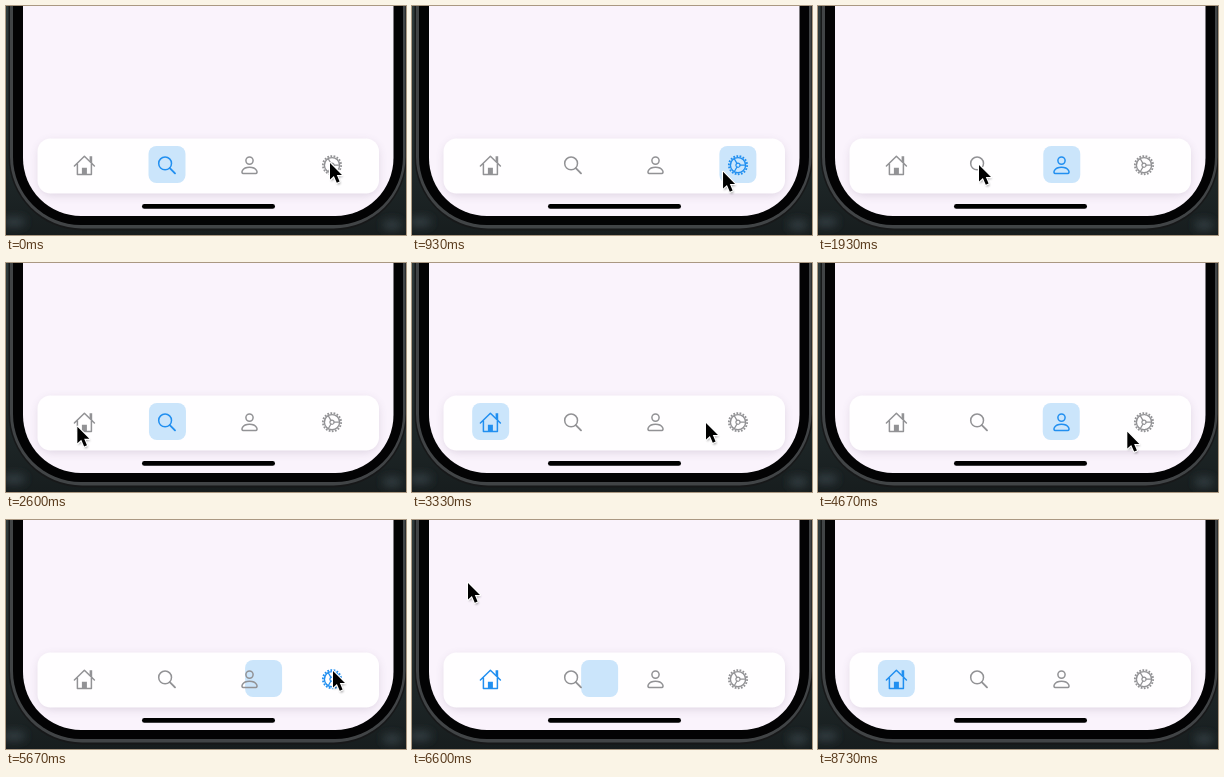
Write an HTML page that moves like this. It is 400 px wide and 229 px high and loops after 9.14 s.

```html
<!DOCTYPE html>
<html lang="en">
<head>
<meta charset="utf-8">
<title>Tab bar</title>
<style>
  html, body { margin: 0; width: 100%; height: 100%; overflow: hidden; background: #192021; }
  svg { display: block; width: 100%; height: 100%; }
  .icon { color: #929295; fill: none; stroke: currentColor; stroke-width: 1.5; stroke-linecap: round; stroke-linejoin: round; }
  .icon.active { color: #218ff0; }
  .solid { fill: currentColor; stroke: none; }
</style>
</head>
<body>
<svg viewBox="0 0 400 229" preserveAspectRatio="none">
  <defs>
    <linearGradient id="backdrop" x2="0" y2="1">
      <stop offset="0" stop-color="#303b3c"/>
      <stop offset=".6" stop-color="#222c2d"/>
      <stop offset="1" stop-color="#171d1e"/>
    </linearGradient>
    <filter id="soft" x="-20%" y="-50%" width="140%" height="200%"><feGaussianBlur stdDeviation="5"/></filter>
    <filter id="near" x="-40%" y="-40%" width="180%" height="180%"><feGaussianBlur stdDeviation="1.2"/></filter>
    <path id="arrow" d="M0 0V16.6L3.9 13.1L6.8 19.8L9.6 18.6L6.8 12.1H12Z"/>
  </defs>

  <rect width="400" height="229" fill="url(#backdrop)"/>
  <g filter="url(#soft)" fill="#344044">
    <ellipse cx="8" cy="216" rx="12" ry="5"/>
    <ellipse cx="386" cy="219" rx="10" ry="5"/>
  </g>

  <rect x="2.5" y="-100" width="398.5" height="324.5" rx="74" fill="#171819"/>
  <rect x="4" y="-100" width="395.5" height="322.5" rx="72" fill="#414446"/>
  <rect x="7" y="-100" width="390" height="319" rx="68" fill="#030304"/>
  <rect x="17" y="-100" width="370.5" height="310" rx="58" fill="#faf3fc"/>

  <rect x="33" y="136" width="339" height="53" rx="13" fill="#604a70" opacity=".2" filter="url(#soft)"/>
  <rect x="31.5" y="132.5" width="341.5" height="55" rx="13" fill="#fffeff"/>
  <rect x="136" y="198" width="133" height="4.8" rx="2.4" fill="#000"/>

  <rect id="highlight" x="-18.5" y="140" width="37" height="37" rx="8" fill="#cbe5fb"/>

  <g class="icon" transform="translate(78.4 159)">
    <path d="M-10 1L0 -8.7L10 1M-7 -1V9.5H7V-1"/>
    <path class="solid" d="M5.2 -8.7H7.8V-.8L5.2 -3.4ZM-2.5 2.8H2.5V9.5H-2.5Z"/>
  </g>
  <g class="icon" transform="translate(160.8 159)">
    <circle cx="-1.7" cy="-1.6" r="6.4"/>
    <path d="M3 3.1L8.2 8.3" stroke-width="1.9"/>
  </g>
  <g class="icon" transform="translate(243.5 159)">
    <circle cy="-4.4" r="3.6"/>
    <path d="M-6.2 8.5C-9 8.5 -7.6 2.3 0 2.3S9 8.5 6.2 8.5Z"/>
  </g>
  <g class="icon" transform="translate(326 159.2)">
    <circle r="7.6" stroke-width="1.4"/>
    <circle r="9.1" stroke-width="1.9" stroke-linecap="butt" pathLength="36" stroke-dasharray="1.1 .9"/>
    <circle r="2.1" stroke-width="1.2"/>
    <path d="M2.1 0H7.5M-1.05 -1.82L-3.75 -6.5M-1.05 1.82L-3.75 6.5" stroke-width="1.3"/>
  </g>

  <g id="cursor">
    <use href="#arrow" x="1" y="2" fill="#000" opacity=".4" filter="url(#near)"/>
    <use href="#arrow" fill="#000" stroke="#fff" stroke-width="2.2" stroke-linejoin="round" paint-order="stroke"/>
  </g>
</svg>
<script>
  const LOOP = 9140;
  const CURSOR_HIDDEN = 6850;
  const centers = [78.4, 161, 243.5, 326];
  const firstTab = 1;
  // [time, tab]
  const taps = [[100, 3], [1240, 2], [1960, 1], [2640, 0], [3906, 2], [5606, 3], [6437, 0]];
  // [time, x, y] of the pointer tip
  const track = [
    [0, 324, 157], [260, 324, 157], [800, 322, 164], [960, 310, 166],
    [1190, 243, 164], [1320, 241, 165], [1740, 138, 167], [1930, 161, 159],
    [2060, 161, 160], [2480, 62, 168], [2640, 73, 163], [2800, 76, 162],
    [3200, 290, 163], [3330, 294, 160], [3480, 293, 161], [3830, 243, 161],
    [4000, 243.5, 160], [4170, 245, 161], [4650, 309, 169], [4900, 325, 160],
    [5070, 326, 151], [5400, 326, 151], [5670, 327, 151], [5800, 336, 139],
    [6000, 245, 130], [6270, 85, 144], [6440, 74, 162], [6600, 56, 63]
  ];

  const highlight = document.getElementById('highlight');
  const cursor = document.getElementById('cursor');
  const icons = document.querySelectorAll('.icon');

  // critically damped spring, 0.55 s response
  const spring = ms => {
    const w = 2 * Math.PI * ms / 550;
    return 1 - (1 + w) * Math.exp(-w);
  };
  const smooth = p => p * p * (3 - 2 * p);

  function tabState(t) {
    let tab = firstTab, x = centers[tab];
    taps.forEach(([start, next], i) => {
      if (t < start) return;
      const end = Math.min(t, taps[i + 1]?.[0] ?? LOOP);
      x += (centers[next] - x) * spring(end - start);
      tab = next;
    });
    return { tab, x };
  }

  function pointer(t) {
    const i = track.findIndex(key => key[0] > t);
    if (i < 0) return track[track.length - 1].slice(1);
    const [t0, x0, y0] = track[i - 1], [t1, x1, y1] = track[i];
    const p = smooth((t - t0) / (t1 - t0));
    return [x0 + (x1 - x0) * p, y0 + (y1 - y0) * p];
  }

  const begin = performance.now();
  function draw(now) {
    const t = Math.max(0, now - begin) % LOOP;
    const { tab, x } = tabState(t);
    highlight.setAttribute('transform', `translate(${x} 0)`);
    icons.forEach((icon, i) => icon.classList.toggle('active', i === tab));
    cursor.setAttribute('transform', `translate(${pointer(t).join(' ')})`);
    cursor.setAttribute('visibility', t < CURSOR_HIDDEN ? 'visible' : 'hidden');
    requestAnimationFrame(draw);
  }
  draw(begin);
</script>
</body>
</html>
```
